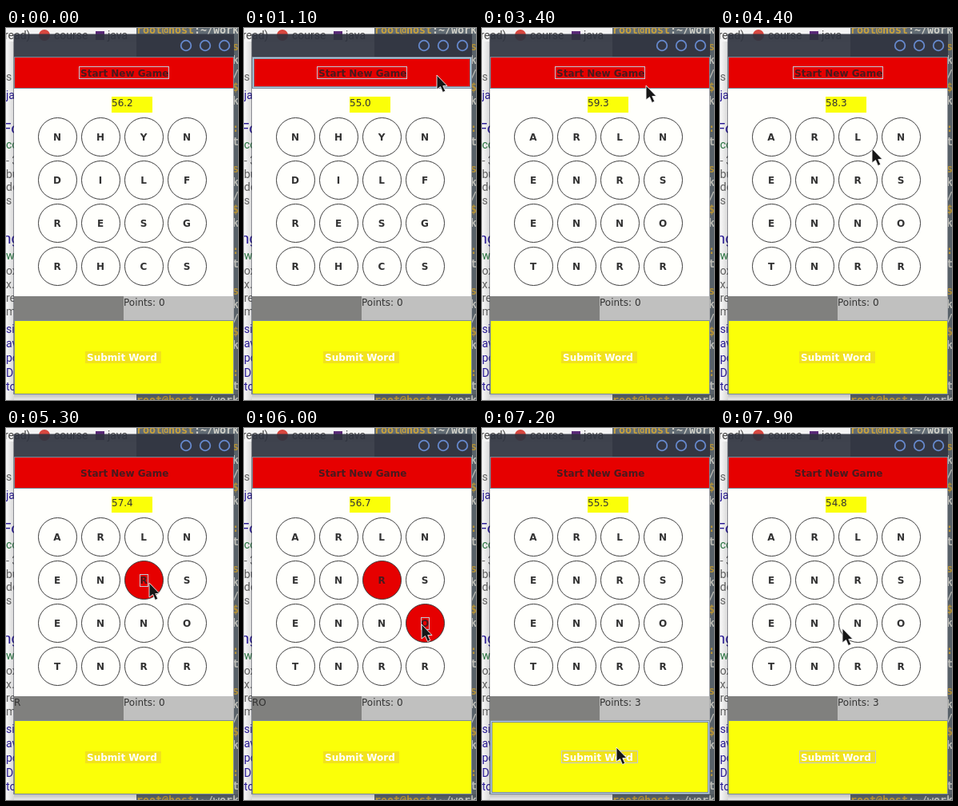
Recreate the animation shown at these times as an HTML page. Size 290 px wide and 466 px high, loop 8 s.

```html
<!DOCTYPE html>
<html lang="en">
<head>
<meta charset="utf-8">
<title>Word game</title>
<style>
html, body { margin: 0; width: 100%; height: 100%; overflow: hidden; background: #fff; }
svg { display: block; width: 290px; height: 466px; }
text { font: 12px "DejaVu Sans", sans-serif; fill: #333; }
.bold { font-weight: bold; }
.mid { text-anchor: middle; }
.onRed { fill: #4a191d; }
#page text { font: 14px Roboto, "Open Sans", sans-serif; fill: #666; }
#page .link { fill: #2a1a9c; }
#page .title { font-size: 19px; fill: #2a1a9c; }
#page .url { fill: #2b7a43; }
#term text, .shell { font: bold 13.3px "DejaVu Sans Mono", monospace; fill: #d0d0c8; }
.tabs text { font: 14px Roboto, sans-serif; fill: #444; }
.focus { fill: none; stroke: #c3c8d4; }
.hover { fill: none; stroke: #7a8a99; stroke-width: 3; }
.hover .light { stroke: #b8cfe5; stroke-width: 1; }
</style>
</head>
<body>
<svg viewBox="0 0 290 466">
  <defs>
    <clipPath id="leftEdge"><rect y="17" width="10" height="449"/></clipPath>
    <clipPath id="rightEdge"><rect x="285" y="17" width="5" height="449"/></clipPath>
    <linearGradient id="shadeL"><stop stop-opacity=".01"/><stop offset="1" stop-opacity=".14"/></linearGradient>
    <linearGradient id="shadeB" x2="0" y2="1"><stop stop-opacity=".24"/><stop offset="1" stop-opacity=".06"/></linearGradient>
  </defs>

  <rect width="290" height="466" fill="#fbfbfb"/>
  <rect width="163" height="17" fill="#f4f4f4"/>
  <rect x="163" width="127" height="466" fill="#626c74"/>
  <g class="tabs">
    <text x="-2" y="14">read)</text>
    <circle cx="48" cy="9" r="7" fill="#d8473f"/>
    <text x="60" y="14">course</text>
    <rect x="112" y="4" width="11" height="11" fill="#5a2a78"/>
    <text x="127" y="14">java</text>
  </g>
  <text class="shell" x="163" y="7"><tspan fill="#c9a23c">root@host</tspan>:~/work</text>
  <text class="shell" x="163" y="471"><tspan fill="#c9a23c">root@host</tspan>:~/work</text>
  <g id="page" clip-path="url(#leftEdge)"></g>
  <g id="term" clip-path="url(#rightEdge)"></g>
  <rect y="17" width="10" height="449" fill="url(#shadeL)"/>
  <rect x="10" y="459" width="280" height="7" fill="url(#shadeB)"/>
  <rect x="285" y="8" width="5" height="451" opacity=".1"/>

  <rect x="9.5" y="7.5" width="275.5" height="451.5" fill="#2f343f" fill-opacity=".92"/>
  <g fill="none" stroke="#6689cd" stroke-width="1.8">
    <circle cx="225" cy="22" r="6.3"/><circle cx="249" cy="22" r="6.3"/><circle cx="273" cy="22" r="6.3"/>
  </g>
  <rect x="10" y="36" width="274.5" height="422" fill="#fffffc"/>

  <rect x="10.5" y="36.5" width="274" height="39" fill="#e60000" stroke="#7a8a99"/>
  <g id="startHover" class="hover">
    <rect x="11.5" y="37.5" width="272" height="37"/>
    <rect class="light" x="11.5" y="37.5" width="272" height="37"/>
  </g>
  <text class="bold onRed" x="93" y="61">Start New Game</text>

  <rect x="132" y="86" width="51" height="20" fill="#fbff08"/>
  <text id="clock" x="132" y="98"></text>
  <g id="board"></g>

  <rect x="10" y="336" width="137" height="30" fill="#80807e"/>
  <rect x="147" y="336" width="137.5" height="30" fill="#c0c0bf"/>
  <text id="word" x="10" y="348"></text>
  <text id="points" x="147" y="348"></text>

  <rect x="10.5" y="366.5" width="274" height="92" fill="#fbff08" stroke="#7a8a99"/>
  <g id="submitHover" class="hover">
    <rect x="11.5" y="367.5" width="272" height="90"/>
    <rect class="light" x="11.5" y="367.5" width="272" height="90"/>
  </g>
  <rect x="99" y="405" width="95" height="15" fill="#f1e31c"/>
  <text class="bold" x="101" y="417" style="fill:#fff">Submit Word</text>

  <rect id="focus" class="focus"/>
  <path id="cursor" d="M0 0V18L4.5 14.5L7.5 21.5L10.8 20L7.8 13.5H13Z" fill="#161616" stroke="#f4f4f4" stroke-width=".9"/>
</svg>
<script>
const LOOP = 8000, STEP = 100;
const RESET = 2700, SUBMIT = 7200;
const BOARDS = ["NHYNDILFRESGRHCS", "ARLNENRSENNOTNRR"];
const PICKS = [[4900, 6], [5900, 11], [6400, 10]]; // time, cell
const PATH = [ // time, x, y
  [400, 300, 92], [800, 262, 68], [1100, 241, 59], [1600, 215, 55],
  [2000, 207, 52], [2900, 207, 52], [3400, 205, 72], [4200, 195, 130],
  [4800, 179, 194], [5400, 179, 194], [5800, 222, 246], [6000, 222, 246],
  [6300, 178, 248], [6400, 178, 248], [6700, 178, 323], [7000, 168, 400],
  [7300, 168, 400], [7900, 153, 251]
];
const $ = id => document.getElementById(id);

function add(parent, tag, attrs, label = "") {
  const el = document.createElementNS("http://www.w3.org/2000/svg", tag);
  for (const key in attrs) el.setAttribute(key, attrs[key]);
  el.textContent = label;
  parent.append(el);
  return el;
}

const place = i => ({ x: 64.5 + i % 4 * 54, y: 136.5 + (i >> 2) * 54 });
const cells = [...BOARDS[0]].map((_, i) => {
  const { x, y } = place(i);
  return {
    disc: add($("board"), "circle", { cx: x, cy: y, r: 24, stroke: "#3c3c3c" }),
    label: add($("board"), "text", { x: x - .5, y: y + 4.5, class: "bold mid" })
  };
});

// Slivers of the windows behind
[["s", 66, ""], ["ja", 89, "link"], ["Fo", 132, "title"], ["co", 151, "url"],
 ["- 3", 171, ""], ["bui", 188, ""], ["de", 204, ""], [" s", 221, ""],
 ["ng", 270, "title"], ["w.", 290, "url"], ["ox", 309, ""], ["x.", 326, ""],
 ["re", 343, ""], ["mb", 360, ""], ["sin", 382, "link"], ["av", 400, "link"],
 ["po", 418, "link"], ["D", 437, "link bold"], ["tow", 454, "link"]]
  .forEach(([s, y, cls]) => add($("page"), "text", { x: cls === "title" ? -4 : 0, y, class: cls }, s));
for (let i = 0; i < 26; i++) {
  const s = "s/k: k$ t"[i * 5 % 9];
  add($("term"), "text", { x: 283, y: 28 + i * 17, style: i % 3 ? "" : "fill:#c9a23c" }, s);
}

function cursorAt(t) {
  const n = PATH.findIndex(p => p[0] > t);
  if (n === 0) return null;
  if (n < 0) return PATH[PATH.length - 1].slice(1);
  const [a, b] = [PATH[n - 1], PATH[n]];
  const k = (t - a[0]) / (b[0] - a[0]);
  return [1, 2].map(i => a[i] + (b[i] - a[i]) * k);
}

function tenthsLeft(t) {
  const tick = t / STEP;
  return t < RESET ? 562 - tick - (tick > 5) : 600 - (tick - RESET / STEP);
}

function focusBox(t, last) {
  if (t >= SUBMIT) return [99.5, 404.5, 95, 15];
  if (!last) return [91.5, 48.5, 112, 15];
  const { x, y } = place(last[1]);
  return [x - 5, y - 7, 10, 15];
}

function show(el, on) { el.style.visibility = on ? "visible" : "hidden"; }

function draw(t) {
  const letters = BOARDS[t < RESET ? 0 : 1];
  const picked = PICKS.filter(p => t >= p[0]);
  const chosen = t < SUBMIT ? picked.map(p => p[1]) : [];
  cells.forEach((c, i) => {
    const on = chosen.includes(i);
    c.label.textContent = letters[i];
    c.label.classList.toggle("onRed", on);
    c.disc.setAttribute("fill", on ? "#e60000" : "#fffffc");
  });
  $("clock").textContent = (tenthsLeft(t) / 10).toFixed(1);
  $("word").textContent = chosen.map(i => letters[i]).join("");
  $("points").textContent = "Points: " + (t < SUBMIT ? 0 : 3);

  const box = focusBox(t, picked[picked.length - 1]);
  ["x", "y", "width", "height"].forEach((key, i) => $("focus").setAttribute(key, box[i]));

  const pos = cursorAt(t);
  show($("cursor"), pos);
  show($("startHover"), pos && pos[0] < 284 && pos[1] < 70);
  show($("submitHover"), pos && pos[1] > 366);
  if (pos) $("cursor").setAttribute("transform", `translate(${pos.map(Math.round)})`);
}

const start = performance.now();
function frame() {
  const t = (performance.now() - start) % LOOP;
  draw(Math.floor(t / STEP) * STEP);
  requestAnimationFrame(frame);
}
frame();
</script>
</body>
</html>
```
